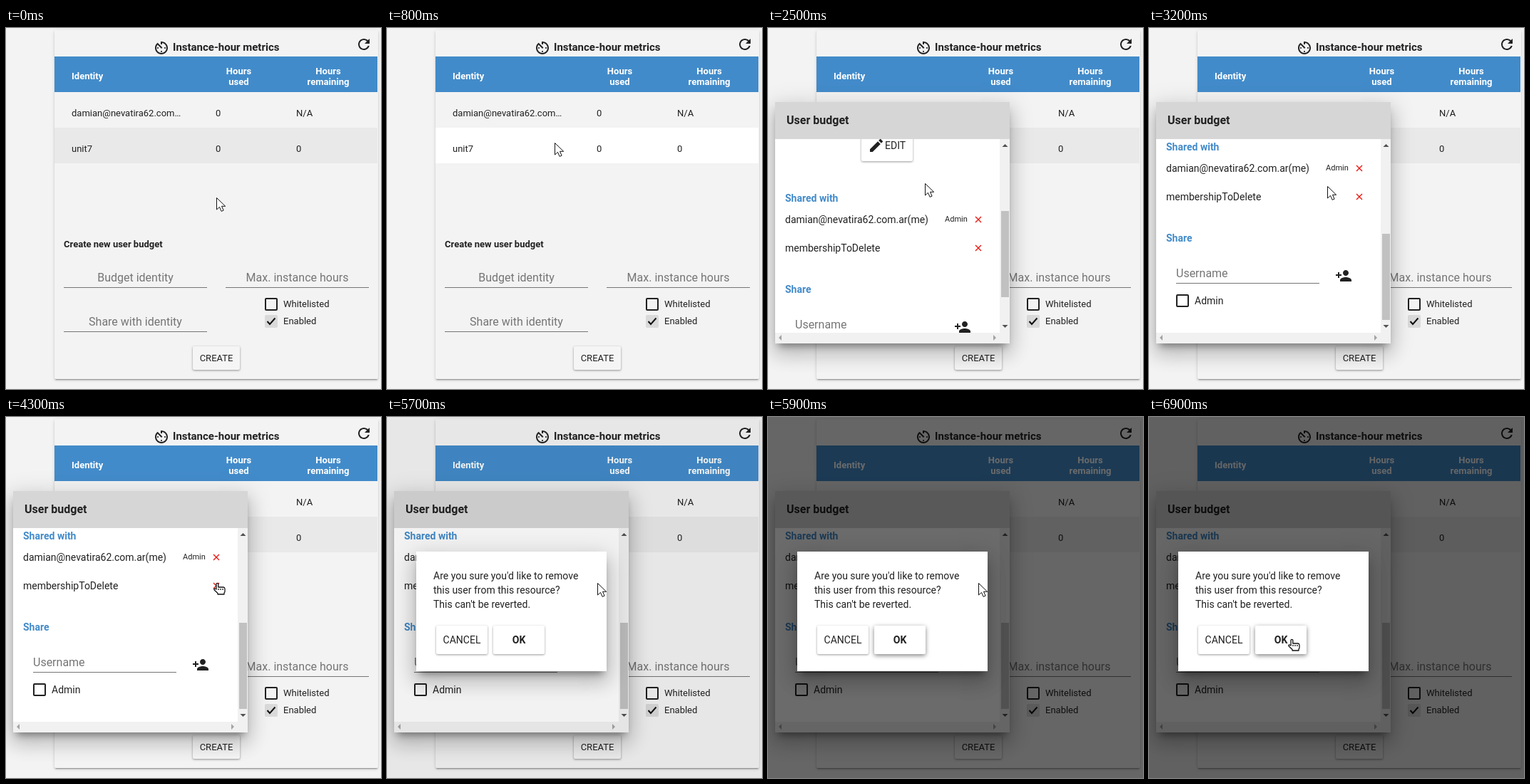
Write an HTML page that moves like this. It is 526x507 px and loops after 8000 ms.

```html
<!DOCTYPE html>
<html lang="en">
<head>
<meta charset="utf-8">
<title>Instance-hour metrics</title>
<style>
html, body { margin: 0; width: 526px; height: 507px; overflow: hidden; background: #f3f3f3; }
body { position: relative; }
div, svg { position: absolute; }
svg { left: 0; top: 0; width: 526px; height: 507px; }
text { font: 13px Roboto, sans-serif; fill: #212121; white-space: pre; }
.b { font-weight: 700; }
.m { text-anchor: middle; }
.s { font-size: 11px; }
.h { font-size: 12px; fill: #737373; }
.l { font-size: 14px; }
.xl { font-size: 16px; }
.hint { font-size: 16px; fill: #757575; }
.white { fill: #fff; }
.blue { fill: #428bca; }
.line { stroke: #757575; fill: none; }
.x { stroke: #e8140c; stroke-width: 1.3; }
.btn { filter: drop-shadow(0 1px 1.5px rgba(0,0,0,.4)); }
.btn.focus { filter: drop-shadow(0 2px 3px rgba(0,0,0,.5)); }
.icon { fill: #212121; }
#card { left: 68px; top: 3px; width: 454px; height: 490px; border-radius: 2px;
  box-shadow: 0 2px 2px rgba(0,0,0,.14), 0 1px 5px rgba(0,0,0,.12), 0 3px 1px -2px rgba(0,0,0,.2); }
.dialog { box-shadow: 0 16px 24px 2px rgba(0,0,0,.14), 0 6px 30px 5px rgba(0,0,0,.12), 0 8px 10px -5px rgba(0,0,0,.4); background: #fff; }
#budget .dialog { left: 10px; top: 104px; width: 329px; height: 339px; }
#confirm .dialog { left: 41px; top: 189px; width: 267px; height: 168px; }
#shade { inset: 0; background: #000; }
</style>
</head>
<body>
<div id="card"></div>
<svg>
  <defs>
    <g id="off"><rect x="-8" y="-8" width="16" height="16" rx="1" fill="none" stroke="#212121" stroke-width="2"/></g>
    <g id="on"><rect x="-9" y="-9" width="18" height="18" rx="2" fill="#dadada"/><path d="M-5.5 0L-2 4 5.5-4.5" fill="none" stroke="#111" stroke-width="2"/></g>
    <path id="cross" class="x" d="M-4-4L4 4M4-4L-4 4"/>
    <clipPath id="view"><rect x="10" y="156" width="315" height="272"/></clipPath>
  </defs>
  <path class="icon" transform="translate(206 16)" d="M11 17c0 .55.45 1 1 1s1-.45 1-1-.45-1-1-1-1 .45-1 1zm0-14v4h2V5.08c3.39.49 6 3.39 6 6.92 0 3.87-3.13 7-7 7s-7-3.13-7-7c0-1.68.59-3.22 1.58-4.42L12 13l1.41-1.41-6.8-6.8v.02C4.42 6.45 3 9.05 3 12c0 4.97 4.02 9 9 9 4.97 0 9-4.03 9-9s-4.03-9-9-9h-1zm7 9c0-.55-.45-1-1-1s-1 .45-1 1 .45 1 1 1 1-.45 1-1zM6 12c0 .55.45 1 1 1s1-.45 1-1-.45-1-1-1-1 .45-1 1z"/>
  <text class="b" x="234" y="32" style="font-size:15px">Instance-hour metrics</text>
  <path class="icon" transform="translate(490 11)" d="M17.65 6.35C16.2 4.9 14.21 4 12 4c-4.42 0-7.99 3.58-7.99 8s3.57 8 7.99 8c3.73 0 6.84-2.55 7.73-6h-2.08c-.82 2.33-3.04 4-5.65 4-3.31 0-6-2.69-6-6s2.69-6 6-6c1.66 0 3.14.69 4.22 1.78L13 11h7V4l-2.35 2.35z"/>
  <rect class="blue" x="68" y="40" width="453" height="50"/>
  <text class="b white" x="92" y="72">Identity</text>
  <text class="b white m" x="326.5" y="65">Hours</text>
  <text class="b white m" x="326.5" y="80">used</text>
  <text class="b white m" x="452" y="65">Hours</text>
  <text class="b white m" x="452" y="80">remaining</text>
  <text x="92" y="124">damian@nevatira62.com…</text>
  <text x="294" y="124">0</text>
  <text x="407" y="124">N/A</text>
  <rect id="row" x="68" y="140" width="453" height="50"/>
  <text x="92" y="174">unit7</text>
  <text x="294" y="174">0</text>
  <text x="407" y="174">0</text>
  <text class="b" x="81" y="308">Create new user budget</text>
  <text class="hint m" x="181.5" y="356">Budget identity</text>
  <text class="hint m" x="408.5" y="356">Max. instance hours</text>
  <text class="hint m" x="181.5" y="418">Share with identity</text>
  <path class="line" d="M81 364.5h201M308 364.5h201M81 426.5h201"/>
  <use href="#off" x="372" y="388"/><text x="389" y="392">Whitelisted</text>
  <use href="#on" x="372" y="412"/><text x="389" y="416">Enabled</text>
  <rect class="btn" x="262" y="447" width="66" height="33" rx="2" fill="#f5f5f5"/>
  <text class="m" x="295" y="468">CREATE</text>
</svg>

<div id="budget">
  <div class="dialog"></div>
  <svg>
    <rect x="10" y="104" width="329" height="52" fill="#d6d6d6"/>
    <text class="xl b" x="26" y="135">User budget</text>
    <g clip-path="url(#view)"><g id="content">
      <text class="l b blue" x="24" y="185">Edit</text>
      <text class="xl b m" x="167" y="206">unit7</text>
      <text class="h m" x="167" y="233">Max. instance hours</text>
      <text class="xl m" x="167" y="255">0</text>
      <path class="line" d="M67 263.5h201M38 623.5h201"/>
      <use href="#off" x="128" y="288"/><text class="l" x="145" y="293">Whitelisted</text>
      <use href="#on" x="128" y="313"/><text class="l" x="145" y="318">Enabled</text>
      <rect class="btn white" x="131" y="336" width="72" height="44" rx="2"/>
      <path class="icon" transform="translate(140 346)" d="M3 17.25V21h3.75L17.81 9.94l-3.75-3.75L3 17.25zM20.71 7.04c.39-.39.39-1.02 0-1.41l-2.34-2.34c-.39-.39-1.02-.39-1.41 0l-1.83 1.83 3.75 3.75 1.83-1.83z"/>
      <text class="l" x="164" y="363">EDIT</text>
      <text class="l b blue" x="24" y="437">Shared with</text>
      <text class="l" x="24" y="467">damian@nevatira62.com.ar(me)</text>
      <text class="s" x="248" y="465">Admin</text>
      <use href="#cross" x="295" y="462"/>
      <text class="l" x="24" y="507">membershipToDelete</text>
      <use href="#cross" x="295" y="502"/>
      <text class="l b blue" x="24" y="565">Share</text>
      <text class="hint" x="38" y="615">Username</text>
      <path class="icon" transform="translate(261 601)" d="M15 12c2.21 0 4-1.79 4-4s-1.79-4-4-4-4 1.79-4 4 1.79 4 4 4zm-9-2V7H4v3H1v2h3v3h2v-3h3v-2H6zm9 4c-2.67 0-8 1.34-8 4v2h16v-2c0-2.66-5.33-4-8-4z"/>
      <use href="#off" x="47" y="648"/><text class="l" x="64" y="653">Admin</text>
    </g></g>
    <path d="M325 156h14v287H10v-15h315z" fill="#f1f1f1"/>
    <path d="M328.5 167l4-4 4 4zM328.5 417l4 4 4-4z" fill="#505050"/>
    <path d="M19 431l-4 4 4 4zM316 431l4 4-4 4z" fill="#a3a3a3"/>
    <rect id="thumb" x="327" y="171" width="11" height="121" fill="#c1c1c1"/>
  </svg>
</div>

<div id="shade"></div>
<div id="confirm">
  <div class="dialog"></div>
  <svg>
    <text class="l" x="65" y="228">Are you sure you'd like to remove</text>
    <text class="l" x="65" y="248">this user from this resource?</text>
    <text class="l" x="65" y="268">This can't be reverted.</text>
    <rect class="btn white" x="69" y="293" width="72" height="40" rx="2"/>
    <text class="l m" x="105" y="318">CANCEL</text>
    <rect id="ok" class="btn white" x="149" y="293" width="72" height="40" rx="2"/>
    <text class="l b m" x="185" y="318">OK</text>
  </svg>
</div>

<svg><g id="cursor" fill="#fff" stroke="#111" stroke-linejoin="round">
  <path id="arrow" d="M.5.5V17l4-3.6 2.6 6 3-1.3-2.6-5.8h5.2z"/>
  <path id="hand" transform="translate(-5 0)" stroke-width="1.3" d="M4 9V1.8a1.4 1.4 0 0 1 2.8 0V6H14q2 .3 2 2.5V12q0 1-1 2v2H6v-1.5L1.2 10q-1-2 .8-2zM7 8v2M10 8v2M13 8v2"/>
</g></svg>

<script>
const LOOP = 8000, TICK = 100;
const $ = id => document.getElementById(id);
const show = (id, on) => { $(id).style.display = on ? '' : 'none'; };

// time, tip x, tip y
const path = [
  [400, 295, 238], [800, 235, 161], [1600, 235, 161], [1700, 234, 165], [2000, 220, 218],
  [3000, 220, 218], [3500, 294, 229], [3600, 301, 231], [3800, 301, 231], [3900, 296, 231],
  [4100, 296, 231], [4300, 296, 233], [5500, 296, 233], [5600, 295, 233],
  [6200, 295, 233], [6900, 200, 312]
];
const scroll = [[2000, 0], [2500, 193], [2700, 265]];
const shade = [[5600, 0], [5700, .05], [5800, .5], [5900, .58], [6000, .6]];

// Linear value of column c in a list of keys
function at(keys, t, c = 1) {
  const i = keys.findIndex(k => k[0] > t);
  if (i < 0) return keys[keys.length - 1][c];
  if (i === 0) return keys[0][c];
  const a = keys[i - 1], b = keys[i];
  return a[c] + (b[c] - a[c]) * (t - a[0]) / (b[0] - a[0]);
}

function draw(t) {
  const x = at(path, t), y = at(path, t, 2), top = at(scroll, t);
  const onOk = t > 6200 && x < 221 && y > 293;
  const hand = (t >= 3600 && t < 5600) || onOk;
  $('cursor').setAttribute('transform', `translate(${Math.round(x)} ${Math.round(y)})`);
  show('hand', hand);
  show('arrow', !hand);
  $('row').setAttribute('fill', y > 140 && y < 190 ? '#fff' : '#e9e9e9');
  show('budget', t >= 1200);
  $('content').setAttribute('transform', `translate(0 ${-Math.round(top)})`);
  $('thumb').setAttribute('y', 171 + Math.round(top * 118 / 265));
  $('shade').style.opacity = at(shade, t);
  show('confirm', t >= 5700);
  $('ok').classList.toggle('focus', t >= 5800);
}

function frame(now) {
  draw(Math.floor(now % LOOP / TICK) * TICK);
  requestAnimationFrame(frame);
}
draw(0);
requestAnimationFrame(frame);
</script>
</body>
</html>
```
